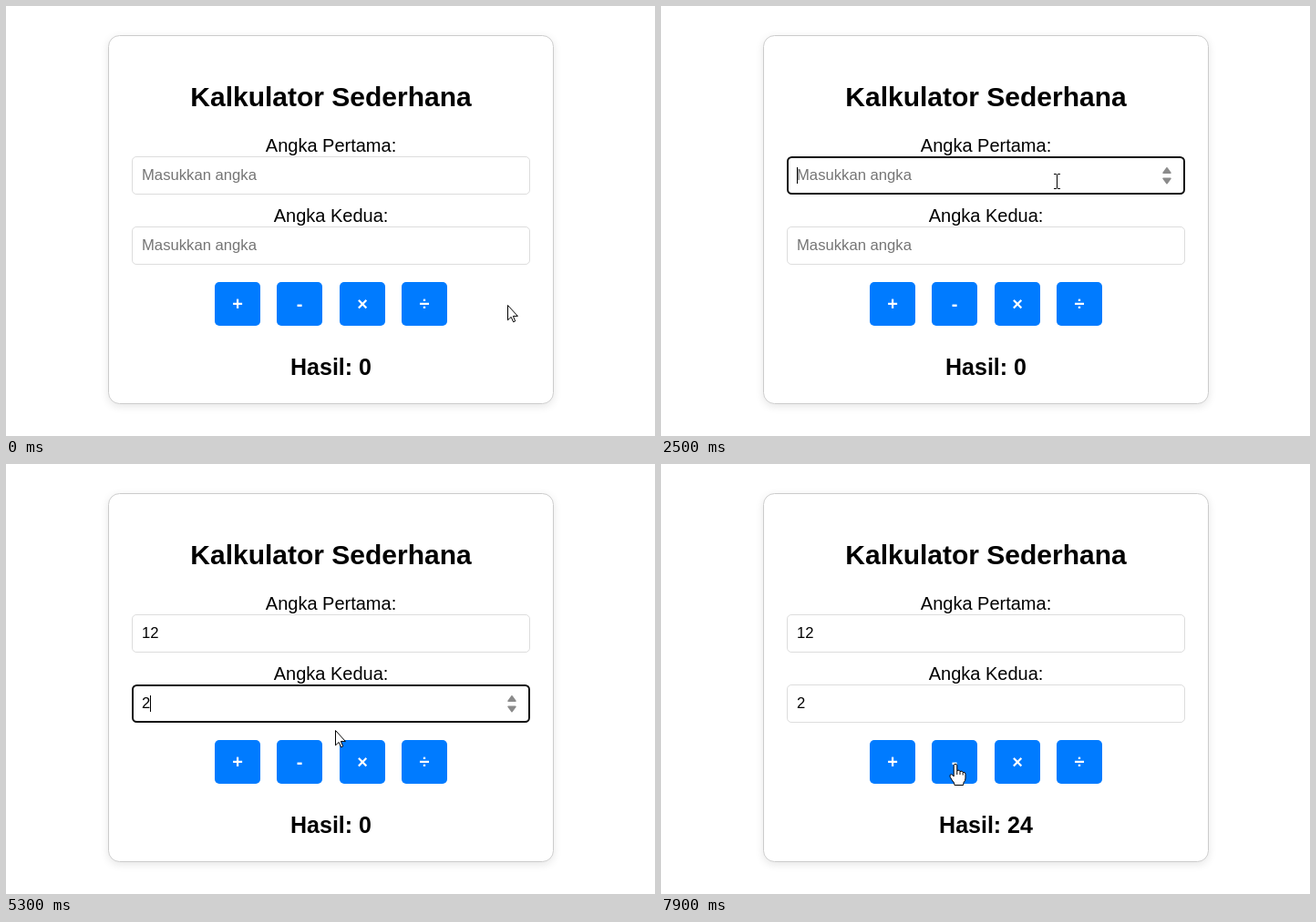
These frames come from a looping animation (712x472 px, 8 s). An HTML page with a canvas:

```html
<!DOCTYPE html>
<html lang="id">
<head>
<meta charset="utf-8">
<title>Kalkulator Sederhana</title>
<style>
  html, body { margin: 0; width: 100%; height: 100%; overflow: hidden; background: #fff; }
  canvas { display: block; }
</style>
</head>
<body>
<canvas id="stage" width="712" height="472"></canvas>
<script>
const ctx = document.getElementById('stage').getContext('2d');
const LOOP = 8000, STEP = 100;
const FONT = '"Liberation Sans", Arial, sans-serif';
const MID = 356.5;

// Pointer stops: time, x, y
const PATH = [
  [0, 550, 328], [200, 546, 324], [500, 546, 324],
  [1400, 437, 196], [1700, 436, 194], [2000, 434, 192],
  [3600, 434, 192], [4100, 331, 253],
  [5000, 331, 253], [5600, 391, 331],
  [6900, 391, 331], [7600, 323, 329], [LOOP, 323, 329]
];

// Each field: focus span and the times at which its value changes
const FIELDS = [
  { y: 165, focus: 2050, blur: 4250, typed: [[2750, '1'], [3150, '12']] },
  { y: 242, focus: 4250, blur: 6350, typed: [[4950, '2']] }
];
const BUTTONS = ['+', '-', '×', '÷'].map((label, i) => ({ label, x: Math.round(229 + i * 68.4) }));
const RESULT_AT = 6350;

const HAND = new Path2D('M-1.8 1.8Q-1.6 .3 0 .3Q1.6 .3 1.8 1.8V7.5Q4.5 6.2 5 8.5Q7.6 7.3 8.2 9.4' +
  'Q10.8 8.8 11 11.2V16Q11 18.8 9 20.7L8.6 23.5H-1L-1.5 21Q-4 18 -5.8 14.5Q-6.6 12 -4.8 11.6Q-3 11.8 -1.8 14Z');
const KNUCKLES = new Path2D('M1.8 7.5V12M5 8.5V12M8.2 9.4V12.5');
const ARROW = new Path2D('M.5 .5V16.8L4.2 13.4L6.6 18.8L8.7 17.9L6.4 12.4H11.4Z');

function pointerAt(t) {
  const i = Math.max(1, PATH.findIndex(p => p[0] > t));
  const [t0, x0, y0] = PATH[i - 1], [t1, x1, y1] = PATH[i];
  const u = (t - t0) / (t1 - t0), e = u * u * (3 - 2 * u);
  return { x: Math.round(x0 + (x1 - x0) * e), y: Math.round(y0 + (y1 - y0) * e) };
}

const inside = (p, x, y, w, h) => p.x >= x && p.x < x + w && p.y >= y && p.y < y + h;
const overField = (p, f) => inside(p, 138, f.y, 437, 42);
const overButton = (p, b) => inside(p, b.x, 303, 50, 48);

function text(str, x, y, size, { bold = false, color = '#000', align = 'center' } = {}) {
  ctx.font = `${bold ? 'bold ' : ''}${size}px ${FONT}`;
  ctx.textAlign = align;
  ctx.fillStyle = color;
  ctx.fillText(str, x, y);
}

function box(x, y, w, h, r) {
  ctx.beginPath();
  ctx.roundRect(x, y, w, h, r);
}

function card() {
  ctx.save();
  ctx.shadowColor = 'rgba(0,0,0,.1)';
  ctx.shadowBlur = 10;
  ctx.shadowOffsetY = 2.5;
  ctx.fillStyle = '#fff';
  box(112, 32, 489, 405, 12.5);
  ctx.fill();
  ctx.restore();
  ctx.strokeStyle = '#ccc';
  ctx.lineWidth = 1;
  box(112.5, 32.5, 488, 404, 12);
  ctx.stroke();
}

function spinner(y) {
  ctx.fillStyle = ctx.strokeStyle = '#8b8b8b';
  ctx.lineWidth = 1.5;
  ctx.lineJoin = 'round';
  for (const [base, tip] of [[18.2, 12.8], [24.3, 29.7]]) {
    ctx.beginPath();
    ctx.moveTo(551, y + base);
    ctx.lineTo(555, y + tip);
    ctx.lineTo(559, y + base);
    ctx.closePath();
    ctx.fill();
    ctx.stroke();
  }
}

function field(f, t, pointer) {
  const focused = t >= f.focus && t < f.blur;
  const [lastKey, value] = f.typed.filter(k => k[0] <= t).pop() || [f.focus, ''];
  const line = focused ? 2 : 1;
  ctx.lineWidth = line;
  ctx.strokeStyle = focused ? '#101010' : '#ddd';
  box(138 + line / 2, f.y + line / 2, 437 - line, 42 - line, 4.5);
  ctx.stroke();

  text(value || 'Masukkan angka', 149, f.y + 26, 16.667,
    { align: 'left', color: value ? '#000' : '#757575' });
  if (focused && (t - lastKey) % 1000 < 500) {
    ctx.fillStyle = '#000';
    ctx.fillRect(Math.floor(149 + ctx.measureText(value).width), f.y + 12, 1, 18);
  }
  if (focused || overField(pointer, f)) spinner(f.y);
}

function button(b) {
  ctx.fillStyle = '#007bff';
  box(b.x, 303, 50, 48, 5);
  ctx.fill();
  text(b.label, b.x + 25, 334, 20, { bold: true, color: '#fff' });
}

function ibeam({ x, y }) {
  ctx.fillStyle = '#000';
  ctx.fillRect(x, y - 7, 1, 15);
  for (const end of [y - 8, y + 8]) {
    ctx.fillRect(x - 3, end, 3, 1);
    ctx.fillRect(x + 1, end, 3, 1);
  }
}

function shapePointer(p, shape, detail) {
  ctx.save();
  ctx.translate(p.x, p.y);
  ctx.fillStyle = '#fff';
  ctx.strokeStyle = '#000';
  ctx.lineWidth = 1;
  ctx.lineJoin = 'miter';
  ctx.fill(shape);
  ctx.stroke(shape);
  if (detail) ctx.stroke(detail);
  ctx.restore();
}

function drawPointer(p) {
  if (FIELDS.some(f => overField(p, f))) ibeam(p);
  else if (BUTTONS.some(b => overButton(p, b))) shapePointer(p, HAND, KNUCKLES);
  else shapePointer(p, ARROW);
}

function draw(t) {
  const pointer = pointerAt(t);
  ctx.fillStyle = '#fff';
  ctx.fillRect(0, 0, 712, 472);
  card();
  text('Kalkulator Sederhana', MID, 110, 30, { bold: true });
  text('Angka Pertama:', MID, 160, 20);
  text('Angka Kedua:', MID, 237, 20);
  FIELDS.forEach(f => field(f, t, pointer));
  BUTTONS.forEach(button);
  text('Hasil: ' + (t < RESULT_AT ? 0 : 24), MID, 405, 25, { bold: true });
  drawPointer(pointer);
}

const start = performance.now();
function tick() {
  const t = (performance.now() - start) % LOOP;
  draw(Math.floor(t / STEP) * STEP);
  requestAnimationFrame(tick);
}
tick();
</script>
</body>
</html>
```
